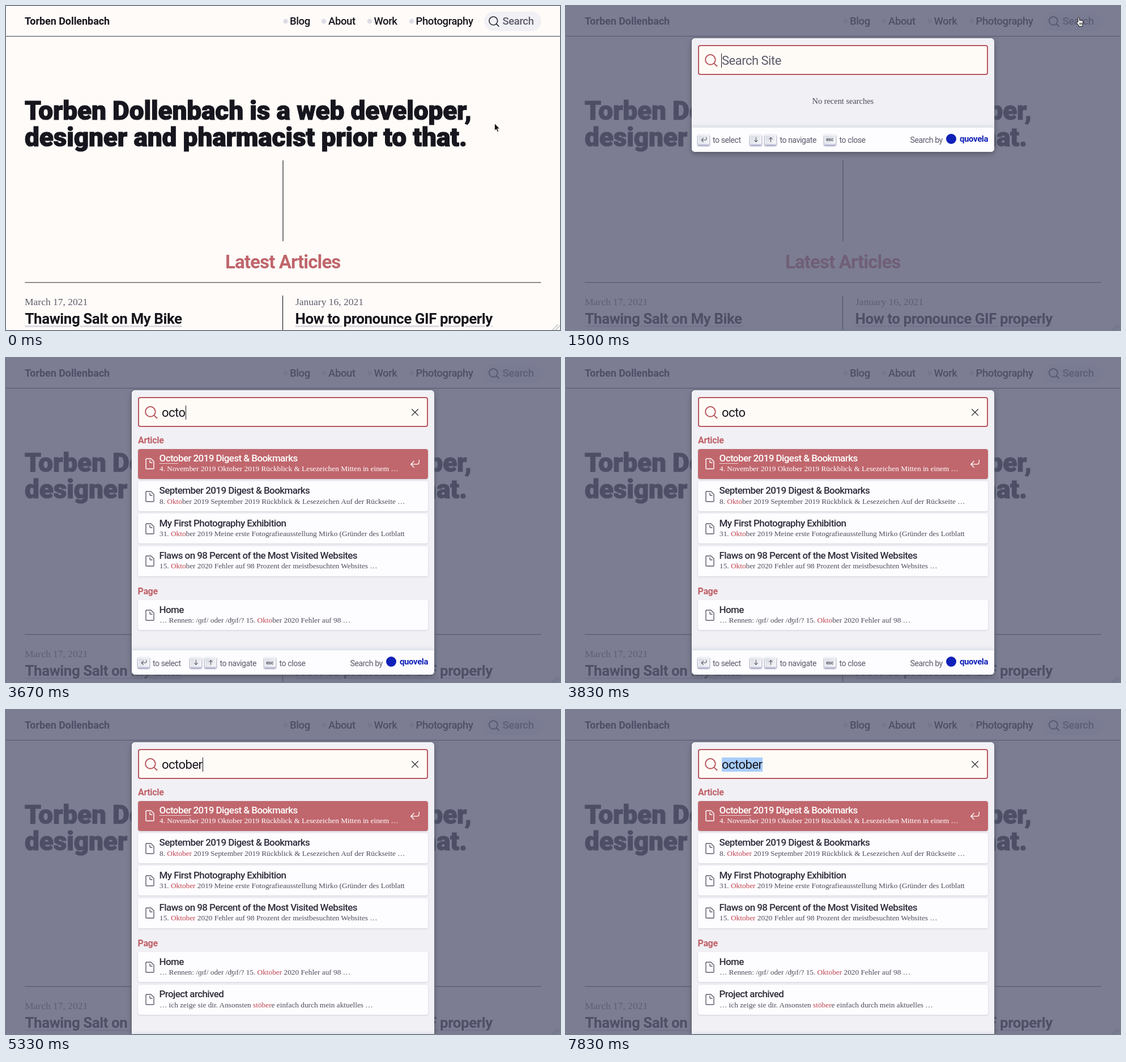
These frames come from a looping animation (978 px wide and 573 px high, 8 s). An HTML page:

```html
<!DOCTYPE html>
<html lang="en">
<head>
<meta charset="utf-8">
<title>Site search</title>
<style>
  html, body { margin: 0; width: 100%; height: 100%; overflow: hidden; background: #fefbf8; }
  #stage { position: relative; width: 978px; height: 573px; overflow: hidden; }
  #stage div, #stage svg { position: absolute; box-sizing: border-box; }
  svg { overflow: visible; fill: none; }
  .fill { inset: 0; width: 978px; height: 573px; }

  /* Zero line height: .34em above the baseline is the top of the box. */
  .text { white-space: pre; line-height: 0; color: #17161e; font-family: Roboto, sans-serif; }
  .serif { font-family: "Liberation Serif", serif; }
  .brand { font-size: 18px; font-weight: 700; letter-spacing: -.05px; }
  .nav { font-size: 18.5px; font-weight: 500; letter-spacing: -.4px; }
  .hero { font-size: 46px; font-weight: 900; letter-spacing: -.13px; -webkit-text-stroke: 1.2px #17161e; }
  .latest { font-size: 33px; font-weight: 700; letter-spacing: -.88px; color: #c0656c; }
  .date { font-size: 17.5px; color: #5d5c6b; }
  .post { font-size: 26px; font-weight: 700; letter-spacing: -.46px;
    text-decoration: underline 2.5px #dcdae3; text-underline-offset: 3px; }

  #pill { left: 844px; top: 10px; width: 100.5px; height: 34px; border-radius: 17px; background: #f1f0f5; }
  #pill.hover { background: #fefbf8; border: 2px solid #c0656c; }
  #label { color: #5d5c6b; }
  #label.hover { color: #17161e; }
  #overlay { background: rgba(92, 94, 122, .8); }

  #modal { left: 222px; top: 57px; width: 534px; border-radius: 6px; background: #f1f0f5;
    box-shadow: inset 1px 1px 0 rgba(255, 255, 255, .5), 0 3px 8px #555a64; }
  .field { left: 233px; top: 69px; width: 512px; height: 53px; border-radius: 4px;
    border: 2px solid #b9585f; background: #fefaf6; }
  .query { font-size: 22px; letter-spacing: -.5px; }
  .hint { color: #5d5c6b; }
  .caret { box-shadow: 1px 0 #17161e; }
  .hint .caret { box-shadow: -1px 0 #17161e; }
  .picked { background: #a9cdfa; }
  .empty { font-size: 14.4px; color: #4c4b59; }
  .section { font-size: 16px; font-weight: 700; letter-spacing: -.35px; color: #bf6067; }
  .card { left: 233px; width: 512px; height: 53px; border-radius: 4px; background: #fdfcff;
    box-shadow: 0 1px 3px #d0d2dc; }
  .card.active { background: #c0676d; }
  .title { font-size: 17px; font-weight: 500; letter-spacing: -.58px; color: #2f2e3a; }
  .sub { font-size: 13.3px; color: #4d4c5a; }
  .sub b { font-weight: 400; color: #c0424c; }
  .title b { font-weight: 500; text-decoration: underline 1px #efd0d2; text-underline-offset: 3px; }
  .active .text { color: #fff; }
  .footer { left: 222px; width: 534px; height: 43px; border-radius: 0 0 6px 6px; background: #fdfcff;
    box-shadow: 0 -1px 0 #e0e3e8, 0 -3px 6px rgba(69, 98, 155, .12); }
  .help { font-size: 14px; letter-spacing: -.4px; color: #5a5969; }
  .key { width: 20px; height: 18px; border-radius: 2px; background: linear-gradient(-225deg, #d5dbe4, #f8f8f8);
    box-shadow: inset 0 -2px #cdcde6, inset 0 0 1px 1px #fff, 0 1px 2px 1px rgba(30, 35, 90, .4); }
  .esc { font-size: 8.5px; font-weight: 700; letter-spacing: -.3px; color: #5a5969; }
  .sponsor { font-size: 15px; font-weight: 700; letter-spacing: -.4px; color: #1021b8; }
</style>
</head>
<body>
<div id="stage"></div>
<script>
const $ = id => document.getElementById(id);
const text = (cls, x, y, content, id = '') =>
  `<div class="text ${cls}" id="${id}" style="left:${x}px;top:calc(${y}px - .34em)">${content}</div>`;
const icon = (x, y, size, d, color, width) =>
  `<svg style="left:${x}px;top:${y}px" width="${size}" height="${size}" viewBox="0 0 20 20">
   <path d="${d}" stroke="${color}" stroke-width="${width}" stroke-linecap="round" stroke-linejoin="round"/></svg>`;

const LENS = 'M1 9a8 8 0 1 0 16 0a8 8 0 1 0-16 0M14.7 14.7L19.5 19.5';
const SHEET = 'M17 6v12q0 1-1 1H4q-1 0-1-1V2q0-1 1-1h8zM14 8h-3q-1 0-1-1V4';
const ENTER = 'M18 3v4q0 4-4 4H2M8 17l-6-6 6-6';
const DOWN = 'M10 3v14M5 12l5 5 5-5';
const UP = 'M10 17V3M5 8l5-5 5 5';
const CROSS = 'M1 1L19 19M19 1L1 19';
const NAME = 'Torben Dollenbach';

const NAV = [['Blog', 502, 493.5], ['About', 570, 561], ['Work', 650.5, 642], ['Photography', 724.5, 716]];

// Title, excerpt, and the word in the excerpt that is marked.
const HITS = [
  ['October 2019 Digest & Bookmarks', '4. November 2019 Oktober 2019 Rückblick & Lesezeichen Mitten in einem …'],
  ['September 2019 Digest & Bookmarks', '8. Oktober 2019 September 2019 Rückblick & Lesezeichen Auf der Rückseite …', 'Oktober'],
  ['My First Photography Exhibition', '31. Oktober 2019 Meine erste Fotografieausstellung Mirko (Gründer des Lotblatt', 'Oktober'],
  ['Flaws on 98 Percent of the Most Visited Websites', '15. Oktober 2020 Fehler auf 98 Prozent der meistbesuchten Websites …', 'Oktober'],
  ['Home', '… Rennen: /ɡɪf/ oder /ʤɪf/? 15. Oktober 2020 Fehler auf 98 …', 'Oktober'],
  ['Project archived', '… ich zeige sie dir. Ansonsten stöbere einfach durch mein aktuelles …', 'stöber'],
];

// Step at which each query appears, and how many hits it shows.
const TYPING = [[0, '', 0], [19, 'o', 0], [20, 'oc', 0], [21, 'oct', 4], [22, 'octo', 5],
  [25, 'octob', 5], [27, 'octobe', 5], [29, 'october', 6]];
const STEPS_PER_SECOND = 6, LOOP = 8000;
const OPEN = 9, SELECT = 39;

const page = () => `
  <svg class="fill">
    <path d="M0 53.5H978" stroke="#3f4054" stroke-width="1.2"/>
    <path d="M489 273V416M33.5 489H944.5M488.5 512V573" stroke="#22212b" stroke-width="1.2"/>
    <path d="M964.5 573l10-10M970 573l8-8" stroke="#8d8d92"/>
    ${NAV.map(([, , dot]) => `<circle cx="${dot}" cy="27" r="4.2" fill="#dddbe3"/>`).join('')}
  </svg>
  ${text('brand', 33, 33, NAME)}
  ${NAV.map(([label, x]) => text('nav', x - 1, 33.3, label)).join('')}
  <div id="pill"></div>
  ${icon(852, 17.5, 18.5, LENS, '#22212b', 1.7)}
  ${text('nav', 876.5, 33.3, 'Search', 'label')}
  ${text('hero', 33, 201, NAME + ' is a web developer,')}
  ${text('hero', 33, 247.5, 'designer and pharmacist prior to that.')}
  ${text('latest', 387, 464, 'Latest Articles')}
  ${text('date serif', 33, 529, 'March 17, 2021')}
  ${text('date serif', 511, 529, 'January 16, 2021')}
  ${text('post', 33.5, 562, 'Thawing Salt on My Bike')}
  ${text('post', 510.5, 562, 'How to pronounce GIF properly')}
  <div class="fill" id="overlay"></div>
  <div class="fill" id="search"></div>
  <svg class="fill" id="cursor">
    <g id="arrow"><path d="M0 0v13l2.9-2.6 2.1 4.9 2.2-1-2.1-4.7h3.9z" fill="#111" stroke="#fff" stroke-width=".9"/></g>
    <g id="hand"><path d="M2.8 9.5V1.7q1.3-1.8 2.5 0V6q1.2-1 2.2.3 1.2-.8 2.1.5 1.5-.7 2.2.9v4q0 2-1.2 3.2v1.6H4.2v-1.6L.4 10.3q-.4-1.8 1.2-1.6zM6 10v3.5M8 10v3.5M10 10v3.5"
      fill="#fff" stroke="#111"/></g>
  </svg>`;

const cardTop = i => 160.5 + i * 57.4 + (i > 3 ? 38.3 : 0);
const mark = (str, word, count) =>
  str.replace(word, `<b>${word.slice(0, count)}</b>${word.slice(count)}`);

function card([title, excerpt, word], i, count) {
  const sub = word ? mark(excerpt, word, word === 'stöber' ? 6 : count) : excerpt;
  const active = i === 0;
  return `<div class="card ${active ? 'active' : ''}" style="top:${cardTop(i)}px">
    ${icon(11.2, 16.7, 20, SHEET, active ? '#fff' : '#5c5b6b', 1.4)}
    ${text('title', 37.5, 22.3, active ? mark(title, 'October', count) : title)}
    ${text('sub serif', 38, 40.3, sub)}
    ${active ? icon(479.5, 17, 18, ENTER, '#fff', 1.5) : ''}</div>`;
}

function footer(bottom) {
  const key = (x, glyph) => `<div class="key" style="left:${x}px;top:13px">${glyph}</div>`;
  const glyph = d => icon(4.5, 3, 11, d, '#5a5969', 2);
  return `<div class="footer" style="top:${bottom - 43}px">
    ${key(11, glyph(ENTER))}${key(103, glyph(DOWN))}${key(129, glyph(UP))}${key(234, text('esc', 3.3, 11, 'esc'))}
    ${text('help', 37, 27, 'to select')}${text('help', 155.5, 27, 'to navigate')}
    ${text('help', 260.5, 27, 'to close')}${text('help', 385.5, 27, 'Search by')}
    <svg><circle cx="458" cy="20" r="9" fill="#1021b8"/></svg>
    ${text('sponsor', 473, 25, 'quovela')}</div>`;
}

function dialog(step) {
  const [, query, shown] = TYPING.findLast(([from]) => step >= from);
  const picked = step >= SELECT;
  const blink = (step + 4) % 6 < 3;
  const state = picked ? 'picked' : blink ? 'caret' : '';
  const bottom = shown ? cardTop(shown - 1) + 132 : 258;
  return `<div id="modal" style="height:${bottom - 57}px"></div>
    <div class="field"></div>
    ${icon(245, 84.5, 22, LENS, '#b9585f', 1.8)}
    ${text('query ' + (query ? '' : 'hint'), 275, 104, `<span class="${state}">${query || 'Search Site'}</span>`)}
    ${query ? icon(716, 90, 12, CROSS, '#17161e', 2.2) : ''}
    ${shown ? text('section', 233, 151, 'Article') : text('empty serif', 434.5, 173, 'No recent searches')}
    ${shown > 4 ? text('section', 232.5, 418.5, 'Page') : ''}
    ${HITS.slice(0, shown).map((hit, i) => card(hit, i, query.length)).join('')}
    ${footer(bottom)}`;
}

function draw(step) {
  const open = step >= OPEN;
  const p = Math.min(1, Math.max(0, step / 7));
  const ease = p * p * (3 - 2 * p);
  const x = 862.5 + 42.5 * ease, y = 207.5 - 187.5 * ease;
  const over = y < 44;
  for (const id of ['pill', 'label']) $(id).classList.toggle('hover', over && !open);
  $('arrow').style.display = over ? 'none' : '';
  $('hand').style.display = over ? '' : 'none';
  $('arrow').setAttribute('transform', `translate(${x} ${y})`);
  $('hand').setAttribute('transform', `translate(${x - 4} ${y - .5})`);
  $('cursor').style.display = step < 19 ? '' : 'none';
  $('overlay').style.opacity = open ? 1 : step === OPEN - 1 ? .02 : 0;
  $('search').innerHTML = open ? dialog(step) : '';
}

$('stage').innerHTML = page();
const start = performance.now();
let last = -1;
function tick(now) {
  const time = Math.max(0, now - start) % LOOP;
  const step = Math.floor((time + 4) * STEPS_PER_SECOND / 1000) % (LOOP * STEPS_PER_SECOND / 1000);
  if (step !== last) draw(last = step);
  requestAnimationFrame(tick);
}
tick(start);
</script>
</body>
</html>
```
